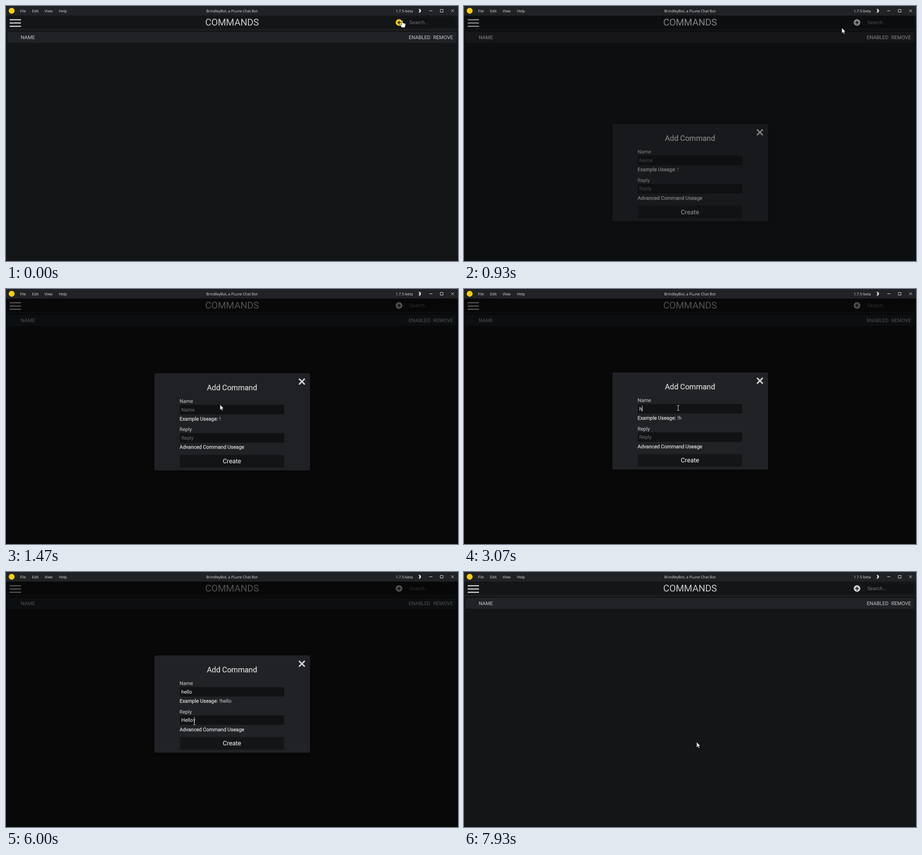
These frames come from a looping animation (996 by 562 pixels, 8000 ms). An HTML page:

```html
<!DOCTYPE html>
<html lang="en">
<head>
<meta charset="utf-8">
<title>Commands</title>
<style>
  html, body { margin: 0; width: 100%; height: 100%; overflow: hidden; background: #141517; }
  svg { display: block; width: 996px; height: 562px; }
  text { font: 11.07px Roboto, sans-serif; fill: #c9cacb; white-space: pre; text-rendering: geometricPrecision; }
  .bar text { font: 8.15px "Open Sans", "Noto Sans", sans-serif; fill: #e2e2e2; }
  #modal text { fill: #d0d1d2; }
  .mid { text-anchor: middle; }
  text.bold { stroke: #d0d1d2; stroke-width: .35; }
  text.hint, #modal text.hint { fill: #707172; }
  #modal text.typed, #modal text.button { fill: #fff; }
  .panel { fill: #212226; }
  .field { fill: #111214; }
  .line { fill: none; stroke: #dcdcdc; }
</style>
</head>
<body>
<svg viewBox="0 0 996 562">
  <rect width="996" height="562" fill="#141517"/>

  <!-- page -->
  <path d="M8 30.2h25M8 37.5h25M8 44.8h25" stroke="#d0d1d2" stroke-width="2.6"/>
  <text class="mid" x="498.2" y="43.4" style="font-size:20.75px">COMMANDS</text>
  <g id="plus" fill="#c9cacb">
    <circle cx="866" cy="36.4" r="7.3"/>
    <path d="M862 36.4h8M866 32.4v8" stroke="#141517" stroke-width="1.9"/>
  </g>
  <rect class="field" x="885" y="26" width="104" height="20" rx="2"/>
  <text class="hint" x="888.5" y="40.1">Search...</text>
  <rect class="panel" y="51" width="996" height="2.6"/>
  <rect class="panel" x="3" y="57" width="990" height="24"/>
  <text x="32.6" y="73.3">NAME</text>
  <text x="887.4" y="73.3">ENABLED</text>
  <text x="941.4" y="73.3">REMOVE</text>

  <rect id="shade" y="21" width="996" height="541"/>

  <!-- window bar -->
  <g class="bar">
    <rect class="panel" width="996" height="21"/>
    <circle cx="12.5" cy="10.5" r="6.5" fill="#f8cf05"/>
    <text x="30.9" y="13.8">File</text>
    <text x="57.4" y="13.8">Edit</text>
    <text x="85" y="13.8">View</text>
    <text x="116.7" y="13.8">Help</text>
    <text class="mid" x="498" y="13.8">BrindleyBot, a PLune Chat Bot</text>
    <text x="858.8" y="13.8">1.7.5-beta</text>
    <path d="M909 6.5a4.2 4.2 0 1 1 0 8a5.2 5.2 0 0 0 0-8" fill="#dcdcdc"/>
    <path class="line" d="M932.5 10.5h7M957 7.5h6v6h-6zM981 7.5l6 6M987 7.5l-6 6"/>
  </g>

  <!-- dialog -->
  <g id="modal">
    <rect class="panel" x="327" width="343" height="214.5" rx="3" style="filter:drop-shadow(0 1px 2px #0009)"/>
    <path d="M646.6 13l10.8 10.8M657.4 13l-10.8 10.8" stroke="#d0d1d2" stroke-width="3.2" stroke-linecap="round"/>
    <text class="mid bold" x="498" y="37" style="font-size:16.6px">Add Command</text>
    <text x="382.6" y="65.4">Name</text>
    <rect class="field" x="383" y="69.7" width="230" height="21" rx="2.5"/>
    <text id="name" x="386.3" y="84"></text>
    <text class="bold" x="382.6" y="104.4">Example Useage:</text>
    <text id="usage" x="470.3" y="104.4"></text>
    <text x="382.6" y="127.9">Reply</text>
    <rect class="field" x="383" y="132.2" width="230" height="21" rx="2.5"/>
    <text id="reply" x="386.3" y="146"></text>
    <text class="bold" x="382.6" y="166.9">Advanced Command Useage</text>
    <rect id="create" x="383" y="180" width="230" height="27.7" rx="2.5"/>
    <text class="mid button" x="498" y="198.7" style="font-size:13.83px">Create</text>
    <rect id="caret" width="1" height="13" fill="#fff"/>
  </g>

  <!-- pointers, hot spot at 0,0 -->
  <g id="pointer">
    <path id="arrow" d="M.7 0v11.4l2.6-2.4 1.8 4 1.9-.8-1.8-3.9h3.5z" fill="#fff" stroke="#000" stroke-width=".5"/>
    <path id="beam" d="M-2.5-5.3h2l.5.5.5-.5h2M0-5v10.2M-2.5 5.5h2l.5-.5.5.5h2" fill="none" stroke="#ddd"/>
    <path id="hand" d="M-1.2-.5q1.2-1.4 2.4 0v4.8l5 1.1q1.4.4 1.3 2l-.8 4.2-1.1 3H-.8L-4.3 9.4q-1-1.8.6-2.1l2.5 1.5z"
      fill="#fff" stroke="#000" stroke-width=".6"/>
  </g>
</svg>
<script>
const $ = id => document.getElementById(id);
const within = (t, ...spans) => spans.some(([a, b]) => t >= a && t < b);

const OPEN = 600, CLOSE = 7930, LOOP = 8000;
const nameKeys = [3070, 3130, 3270, 3400, 3530];
const replyKeys = [5400, 5530, 5600, 5730, 5930, 6000, 6070, 6270, 6330, 6470, 6600, 6870];

// time, x, y
const path = [
  [0, 873, 33], [70, 873, 33], [330, 870, 29], [600, 870, 29], [800, 862, 33],
  [930, 833, 48], [1070, 690, 106], [1200, 541, 166], [1330, 492, 225],
  [1470, 471, 255], [1600, 472, 262], [4200, 472, 262], [4400, 425, 285],
  [4570, 376, 312], [4730, 400, 329], [4870, 415, 331], [6800, 415, 331],
  [7000, 425, 312], [7130, 431, 303], [7330, 480, 350], [7530, 512, 375], [LOOP, 512, 375]
];

function pointerAt(t) {
  const i = path.findIndex(p => p[0] > t);
  const [t0, x0, y0] = path[i - 1], [t1, x1, y1] = path[i];
  const k = (t - t0) / (t1 - t0);
  return [x0 + (x1 - x0) * k, y0 + (y1 - y0) * k];
}

// cubic-bezier(.25, .1, .25, 1)
function ease(p) {
  if (p <= 0 || p >= 1) return p <= 0 ? 0 : 1;
  const curve = (s, a, b) => 3 * (1 - s) * s * ((1 - s) * a + s * b) + s ** 3;
  let lo = 0, hi = 1;
  for (let i = 0; i < 20; i++) {
    const m = (lo + hi) / 2;
    if (curve(m, .25, .25) < p) lo = m; else hi = m;
  }
  return curve(lo, .1, 1);
}

const typed = (word, keys, t) => word.slice(0, keys.filter(k => k <= t).length);

function fill(id, value, hint) {
  $(id).textContent = value || hint;
  $(id).setAttribute("class", value ? "typed" : "hint");
  return value ? $(id).getComputedTextLength() : 0;
}

function draw() {
  const t = performance.now() % LOOP;
  const shown = t < CLOSE ? ease((t - OPEN) / 1000) : 0;
  $("shade").setAttribute("opacity", .6 * shown);
  $("modal").setAttribute("opacity", shown);
  $("modal").setAttribute("transform", `translate(0 ${183.8 + 178 * (1 - shown)})`);
  $("plus").setAttribute("fill", t < 670 ? "#fcd203" : "#c9cacb");

  const name = typed("hello", nameKeys, t);
  const nameWidth = fill("name", name, "Name");
  const replyWidth = fill("reply", typed("Hello world!", replyKeys, t), "Reply");
  $("usage").textContent = "!" + name;

  const inReply = t >= 4740;
  const caretOn = within(t, [1730, 2270], [2730, 4070], [4740, 5270], [5400, 7400]);
  $("caret").setAttribute("x", 386.2 + (inReply ? replyWidth : nameWidth));
  $("caret").setAttribute("y", inReply ? 135.7 : 73.2);
  $("caret").setAttribute("opacity", caretOn ? 1 : 0);

  const [x, y] = pointerAt(t);
  const open = t > 1400 && t < CLOSE, inside = open && x > 383 && x < 613;
  const onCreate = inside && y > 364 && y < 392;
  const onField = inside && (y > 256 && y < 275 || y > 316 && y < 337);
  const kind = t < 670 || onCreate ? "hand" : onField ? "beam" : "arrow";
  for (const id of ["arrow", "beam", "hand"]) $(id).style.display = id === kind ? "" : "none";
  $("pointer").setAttribute("transform", `translate(${x} ${y})`);
  $("create").setAttribute("fill", onCreate ? "#1a1b1e" : "#141517");

  requestAnimationFrame(draw);
}
draw();
</script>
</body>
</html>
```
